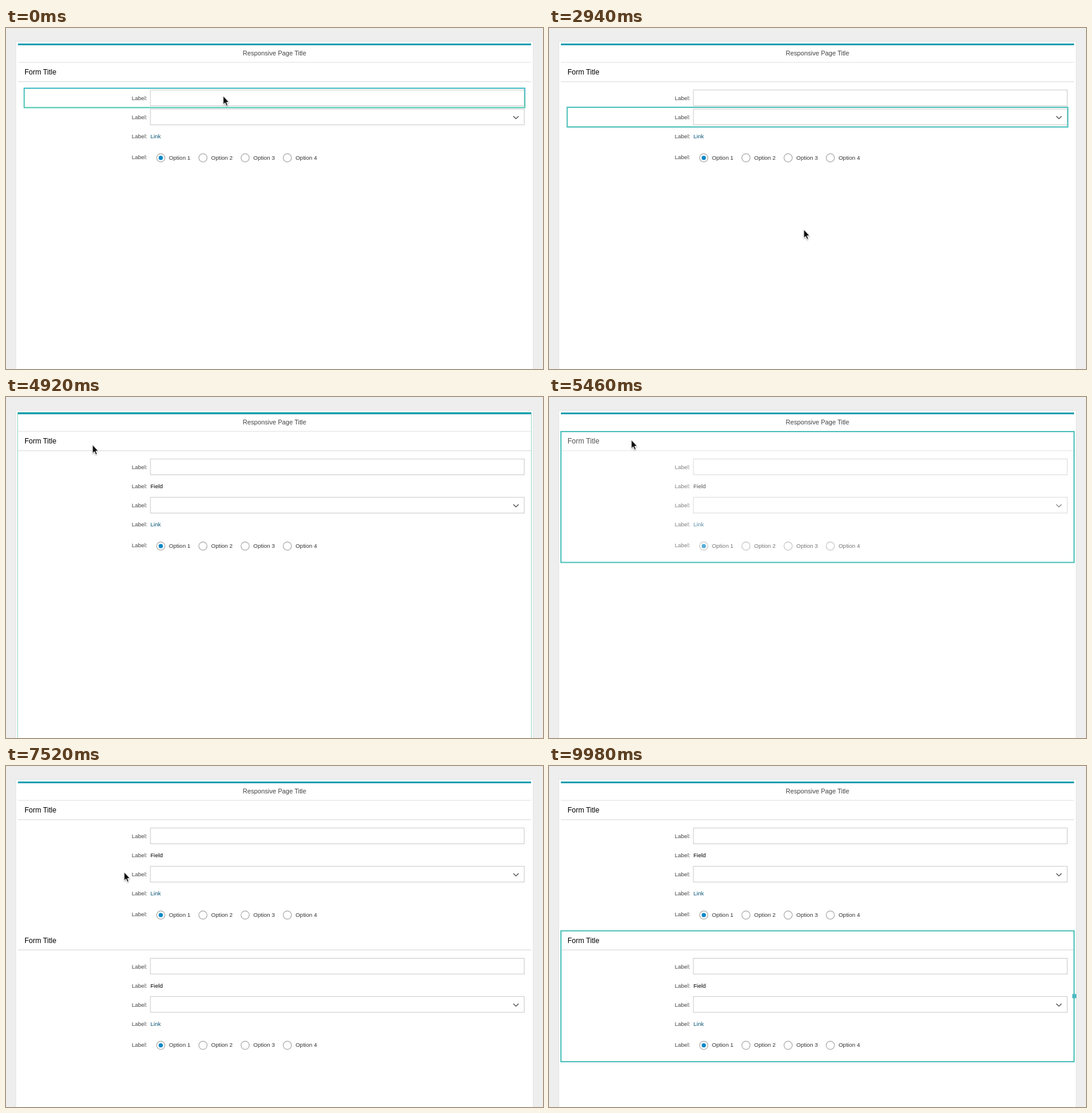
Recreate the animation shown at these times as an HTML page. Size 900 by 572 pixels, loop 10000 ms.

```html
<!DOCTYPE html>
<html lang="en">
<head>
<meta charset="utf-8">
<title>Form editor</title>
<style>
  html, body { margin: 0; width: 100%; height: 100%; overflow: hidden; background: #eee; }
  svg { display: block; width: 900px; height: 572px; font: 9.55px "Liberation Sans", Arial, sans-serif; }
  text { white-space: pre; }
  .label, .option { fill: #444; }
  .option { fill: #333; }
  .box, .radio { fill: #fff; stroke: #c9c9c9; }
  .radio { stroke: #a9a9a9; stroke-width: 1.2; }
  .chevron { fill: none; stroke: #444; stroke-width: 1.2; }
  .outline { fill: none; stroke: #4cc0ba; stroke-width: 2; }
  .hover { fill: none; stroke: #7cc9b8; }
  .handle { fill: #4db9c0; }
  #menu text { font: 14px Lato, sans-serif; letter-spacing: .9px; fill: #666; }
</style>
</head>
<body>
<svg viewBox="0 0 900 572">
  <defs>
    <filter id="soft" x="-20%" y="-20%" width="140%" height="150%">
      <feDropShadow dx="0" dy="5" stdDeviation="5" flood-opacity=".13"/>
    </filter>
    <filter id="near" x="-50%" y="-50%" width="200%" height="200%">
      <feDropShadow dx="0" dy="1.2" stdDeviation="1" flood-opacity=".35"/>
    </filter>
    <linearGradient id="fade" x2="0" y2="1">
      <stop stop-color="#46bcc6"/><stop offset="1" stop-color="#4ac8ae"/>
    </linearGradient>
  </defs>

  <rect x="16.5" y="22.5" width="867" height="560" fill="#fff" stroke="#e4e4e4"/>
  <rect x="20" y="26" width="860" height="3" fill="#1a9eb0"/>
  <text x="450" y="45.5" font-size="10.7" fill="#444" text-anchor="middle">Responsive Page Title</text>
  <path d="M20 57.5H880" stroke="#e2e2e2"/>

  <g id="form"></g>
  <use id="copy" href="#form" y="218.5"/>

  <rect id="row1" class="outline" x="30.5" y="101" width="839" height="32.5" style="stroke:url(#fade)"/>
  <rect id="row2" class="outline" x="30.5" y="133" width="839" height="33"/>
  <rect id="row3" class="hover" x="30.5" y="166.5" width="838" height="31"/>
  <rect id="page" class="hover" x="19.5" y="25.5" width="861" height="560"/>
  <rect id="form1" class="outline" x="20" y="58" width="860" height="219.5"/>
  <rect id="handle1" class="handle" x="877" y="164" width="7" height="7"/>
  <g id="form2">
    <rect class="outline" x="20" y="276.5" width="860" height="219.5"/>
    <rect class="handle" x="877" y="382.5" width="7" height="7"/>
  </g>

  <g id="menu">
    <rect x="139" y="73.5" width="198" height="173" fill="#fff" stroke="#e6e6e6" filter="url(#soft)"/>
    <rect id="choice" x="139" width="198" height="38.4" fill="#f2f2f2"/>
  </g>

  <g id="arrow" filter="url(#near)">
    <path d="M0 0V14.3L3.2 11.4L5.4 16.4L7.7 15.4L5.6 10.5H9.8Z" fill="#111" stroke="#fff" stroke-width=".9"/>
  </g>
  <g id="hand" filter="url(#near)">
    <path d="M-1.6 1Q-.2-1.2 1.3 1L2.6 6Q4 4.5 5.2 6.2Q6.7 5 7.8 6.8Q9.6 6 10 8.2L10.4 12Q10 14 8.8 16.6H1.5Q-1-13 1.5 16.6Q-1.8 12.5-4.6 10.2Q-5 8-2.8 8.4L-.2 10Z" fill="none"/>
    <path d="M-1.6 1Q-.2-1.2 1.3 1L2.6 6Q4 4.5 5.2 6.2Q6.7 5 7.8 6.8Q9.6 6 10 8.2L10.4 12Q10 14 8.8 16.6H1.5Q-1.8 12.5-4.6 10.2Q-5 8-2.8 8.4L-.2 10Z" fill="#fff" stroke="#111" stroke-width="1.2"/>
    <path d="M3.2 11V14M5.4 11V14M7.6 11V14" stroke="#111" stroke-width=".8"/>
  </g>
</svg>

<script>
const LOOP = 10000;
const $ = id => document.getElementById(id);
const text = (x, y, s, cls, extra = "") => `<text x="${x}" y="${y}" class="${cls}" ${extra}>${s}</text>`;
const label = y => text(210.7, y, "Label:", "label");
const box = y => `<rect class="box" x="242" y="${y}" width="626.5" height="26.5"/>`;

const options = [0, 1, 2, 3].map(i => {
  const x = 259.4 + i * 70.7;
  return `<circle class="radio" cx="${x}" cy="217.8" r="6.9"/>` +
    text(x + 13.7, 220.6, "Option " + (i + 1), "option");
}).join("");

$("form").innerHTML =
  text(31, 78.4, "Form Title", "", 'font-size="12"') +
  '<path d="M20 90H880" stroke="#d6d6d6"/>' +
  label(121) + box(104) +
  `<g id="field">${label(153)}${text(242, 153, "Field", "")}</g>` +
  `<g id="rest">${label(153)}${box(136)}
    <path class="chevron" d="M850.3 148L854.6 152.2L859 148"/>
    ${label(185)}${text(242, 185, "Link", "", 'fill="#0a5577"')}
    ${label(220)}${options}<circle cx="259.4" cy="217.8" r="3.6" fill="#0a88c8"/></g>`;

$("menu").insertAdjacentHTML("beforeend", ["Copy", "Paste", "Duplicate", "Delete"].map((s, i) =>
  text(161, 107.6 + i * 38.4, s, "", i === 3 ? 'style="fill:#c0524a"' : "")).join(""));

// Pointer stops: time, x, y
const path = [
  [1020, 364, 114], [2000, 424, 350], [2420, 427, 338], [3600, 427, 338],
  [4100, 268, 120], [4620, 150, 86], [5300, 138, 72], [6000, 138, 72],
  [6540, 184, 157], [6680, 184, 157], [6960, 198, 178]
];

const ease = p => p * p * (3 - 2 * p);
const ramp = (t, a, b) => Math.min(1, Math.max(0, (t - a) / (b - a)));
const pulse = (t, a, b, d = 120) => ramp(t, a, a + d) * (1 - ramp(t, b, b + d));
const show = (id, v) => $(id).setAttribute("opacity", +v);

function pointer(t) {
  if (t <= path[0][0]) return path[0].slice(1);
  const i = path.findIndex(k => k[0] > t);
  if (i < 0) return path[path.length - 1].slice(1);
  const [a, b] = [path[i - 1], path[i]];
  const p = ease(ramp(t, a[0], b[0]));
  return [a[1] + (b[1] - a[1]) * p, a[2] + (b[2] - a[2]) * p];
}

function draw(t) {
  const pasted = t >= 3200;
  show("field", pasted);
  $("rest").setAttribute("transform", `translate(0 ${pasted ? 32.2 : 0})`);
  show("form", 1 - .32 * pulse(t, 5360, 5520, 80));
  show("copy", ramp(t, 7300, 7420));

  show("row1", 1 - ramp(t, 2260, 2380));
  show("row2", pulse(t, 2260, 4700));
  show("row3", pulse(t, 3960, 4120, 60));
  show("page", pulse(t, 4440, 4900));
  show("form1", pulse(t, 5300, 7300));
  show("handle1", t >= 5560 && t < 7300);
  show("form2", ramp(t, 7700, 7800));

  const [x, y] = pointer(t);
  const open = t >= 5900 && t < 7240;
  const item = Math.floor((y - 83.6) / 38.4);
  show("menu", open);
  show("choice", item >= 0);
  $("choice").setAttribute("y", 83.6 + item * 38.4);

  const hand = open && item >= 0;
  const seen = 1 - ramp(t, 9000, 9200);
  show("hand", hand);
  show("arrow", hand ? 0 : seen);
  for (const id of ["arrow", "hand"]) $(id).setAttribute("transform", `translate(${x} ${y})`);
}

const start = performance.now();
function tick() {
  draw((performance.now() - start) % LOOP);
  requestAnimationFrame(tick);
}
tick();
</script>
</body>
</html>
```
